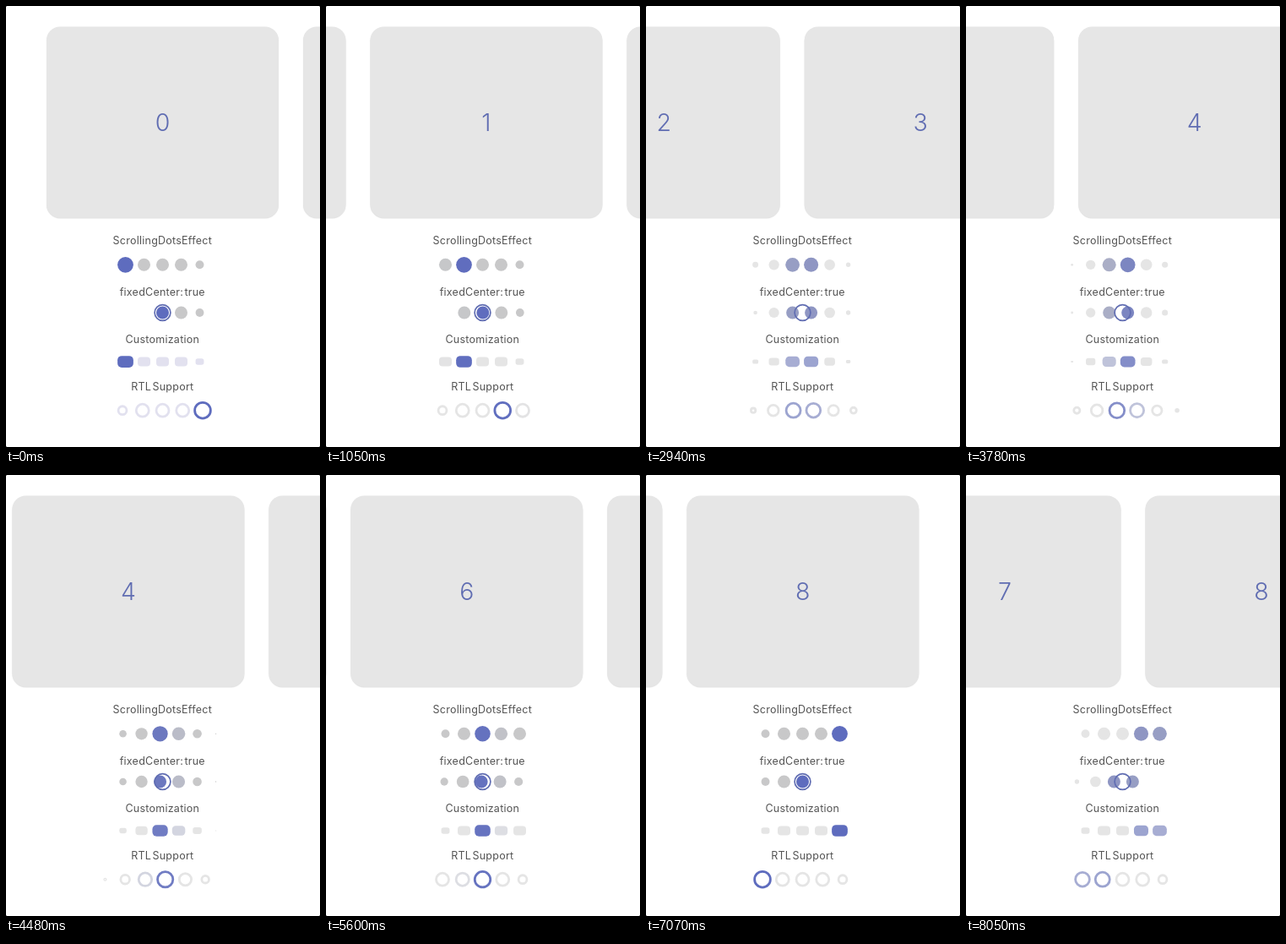
An HTML page with a canvas for the animation above (8.12 s loop, 372x522 px).

```html
<!DOCTYPE html>
<html lang="en">
<head>
<meta charset="utf-8">
<title>Scrolling dots</title>
<style>
  html, body { margin: 0; width: 100%; height: 100%; overflow: hidden; background: #fff; }
  canvas, svg { position: absolute; left: 0; top: 0; width: 372px; height: 522px; }
  text {
    font: 12.5px Inter, Roboto, sans-serif; fill: #545454; text-anchor: middle;
    letter-spacing: .24px; word-spacing: -2.4px;
  }
</style>
</head>
<body>
<canvas id="stage" width="372" height="522"></canvas>
<svg viewBox="0 0 372 522">
  <text x="185.3" y="282">ScrollingDotsEffect</text>
  <text x="185.3" y="342.5">fixedCenter: true</text>
  <text x="185.3" y="399">Customization</text>
  <text x="185.3" y="454.7">RTL Support</text>
</svg>
<script>
const ctx = document.getElementById('stage').getContext('2d');
const LOOP = 8120, STEP = 70, COUNT = 9, HALF = 2, SMALL = 0.66, GROW = 0.25;
const CENTER = 185.5, PAGE = 304, DOT = 15;
const ACTIVE = [94, 108, 190], INK = '#606db2';
const GREY = [200, 200, 201], PALE = [229, 229, 229], LILAC = [226, 225, 239];
const SWIPES = [520, 1435, 2772, 3560, 4399, 4950, 5543, 6260];
const BACK = 7910;

const mix = (a, b, k) => a.map((v, i) => v + (b[i] - v) * k);
const css = c => `rgb(${c.map(Math.round).join()})`;

// A finger drag that speeds up, then an exponential settle.
function swipe(u) {
  if (u <= 0) return 0;
  if (u < 140) return 0.4 * (u / 140) ** 2;
  return 1 - 0.6 * Math.exp((140 - u) / 105);
}

function pageAt(t) {
  if (t > BACK) return COUNT - 1 - 0.541 * ((t - BACK) / 140) ** 2;
  const p = SWIPES.reduce((sum, start) => sum + swipe(t - start), 0);
  return Math.abs(p - Math.round(p)) < 0.001 ? Math.round(p) : p;
}

function colorOf(i, cur, f, base, idle) {
  if (i === cur) return mix(ACTIVE, base, f);
  if (i === cur + 1) return mix(base, ACTIVE, f);
  return idle;
}

// Visible dots of a scrolling row: slot (in dot distances), scale and index.
function scrollingDots(p) {
  const cur = Math.floor(p), f = p - cur;
  const before = cur < HALF, after = cur >= COUNT - 1 - HALF, rolling = !before && !after;
  const first = before ? 0 : Math.min(cur - HALF, COUNT - 5);
  const last = Math.min(first + 5, COUNT - 1);
  const anchor = rolling ? p - HALF : first;
  const dots = [];
  for (let i = first; i <= last; i++) {
    let s = 1;
    if (i === cur) s = 1 + GROW * (1 - f);
    else if (i === cur + 1) s = 1 + GROW * f;
    else if (i === first) {
      if (cur === HALF) s = 1 - f;
      else if (after) s = SMALL;
      else if (rolling) s = SMALL * (1 - f);
    } else if (i === first + 1 && rolling) s = 1 - (1 - SMALL) * f;
    else if (i === last - 1) {
      if (before) s = SMALL;
      else if (rolling) s = SMALL + (1 - SMALL) * f;
    } else if (i === last) {
      if (before) s = 0;
      else if (cur + 1 === COUNT - 1 - HALF) s = f;
      else if (rolling) s = SMALL * f;
    }
    if (s > 0) dots.push({ i, s, slot: i - anchor });
  }
  return dots;
}

function centeredDots(p) {
  const cur = Math.floor(p), f = p - cur;
  const scales = [SMALL * (1 - f), 1 - (1 - SMALL) * f, 1, 1, SMALL + (1 - SMALL) * f, SMALL * f];
  return scales
    .map((s, k) => ({ i: cur - HALF + k, s, slot: cur - HALF + k - p }))
    .filter(d => d.s > 0 && d.i >= 0 && d.i < COUNT);
}

function circle(x, y, r) {
  ctx.beginPath();
  ctx.arc(x, y, r, 0, Math.PI * 2);
}

function box(x, y, w, h, r) {
  ctx.beginPath();
  ctx.roundRect(x, y, w, h, r);
  ctx.fill();
}

function drawCards(p) {
  ctx.font = '300 28.5px Inter, Roboto, sans-serif';
  ctx.textAlign = 'center';
  for (let i = 0; i < COUNT; i++) {
    const x = CENTER + (i - p) * PAGE;
    if (x < -150 || x > 522) continue;
    ctx.save();
    ctx.shadowColor = 'rgba(0,0,0,.13)';
    ctx.shadowOffsetY = 0.6;
    ctx.shadowBlur = 1;
    ctx.fillStyle = '#e6e6e6';
    box(x - 137.5, 24.6, 275, 226.2, 16);
    ctx.restore();
    ctx.fillStyle = INK;
    ctx.fillText(i, x, 148);
  }
}

function draw(t) {
  const p = pageAt(t), cur = Math.floor(p), f = p - cur;
  const grey = f > 0.2 && f < 0.8 ? PALE : GREY;
  const light = p === 0 ? LILAC : PALE;
  const dots = scrollingDots(p);
  const strong = d => css(colorOf(d.i, cur, f, GREY, grey));
  const soft = d => css(colorOf(d.i, cur, f, light, light));

  ctx.fillStyle = '#fff';
  ctx.fillRect(0, 0, 372, 522);
  drawCards(p);

  for (const d of dots) {
    ctx.fillStyle = strong(d);
    circle(141.5 + d.slot * 22, 306.3, d.s * DOT / 2);
    ctx.fill();
  }

  for (const d of centeredDots(p)) {
    ctx.fillStyle = strong(d);
    circle(CENTER + d.slot * 22, 363, d.s * DOT / 2);
    ctx.fill();
  }
  ctx.strokeStyle = INK;
  ctx.lineWidth = 1.7;
  circle(CENTER, 363, 9.4);
  ctx.stroke();

  for (const d of dots) {
    const w = DOT * d.s, h = 11 * d.s;
    ctx.fillStyle = soft(d);
    box(141.5 + d.slot * 22 - w / 2, 421 - h / 2, w, h, 4 * d.s);
  }

  ctx.lineWidth = 2.8;
  for (const d of dots) {
    ctx.strokeStyle = soft(d);
    circle(233 - d.slot * 23.75, 478.7, d.s * DOT / 2);
    ctx.stroke();
  }

  ctx.fillStyle = '#888';
  for (const x of [0, 371]) for (const y of [0, 521]) ctx.fillRect(x, y, 1, 1);
}

const begin = performance.now();
function tick() {
  const t = (performance.now() - begin) % LOOP;
  draw(Math.floor(t / STEP) * STEP);
  requestAnimationFrame(tick);
}
tick();
</script>
</body>
</html>
```
